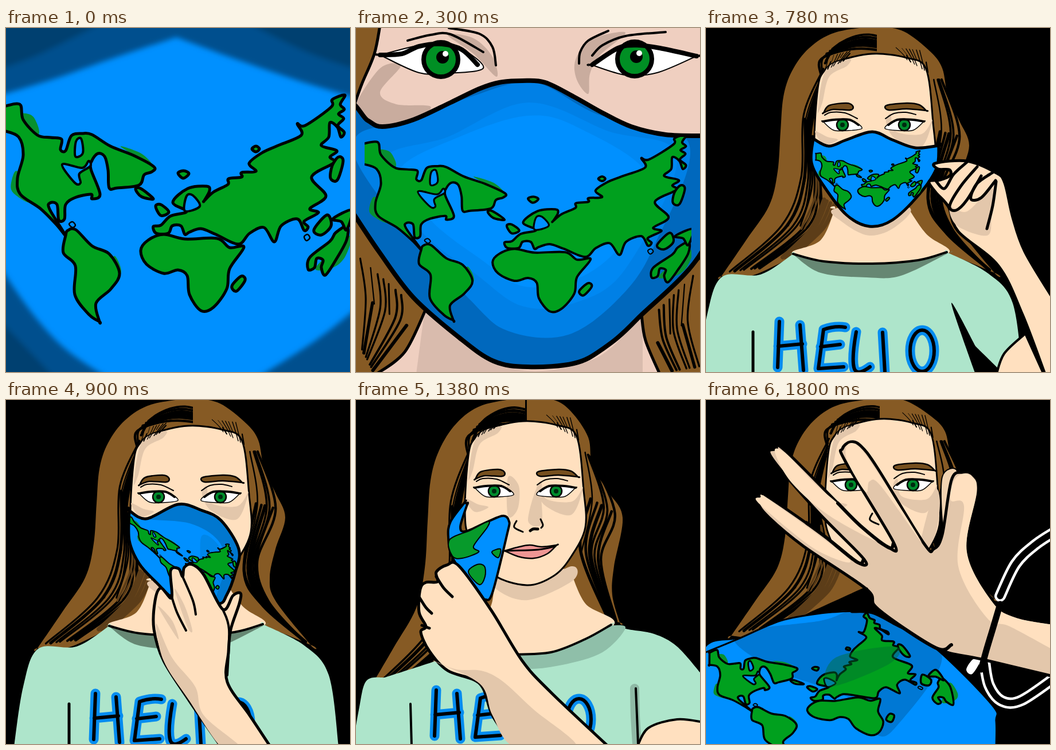
These frames come from a looping animation (600 px wide and 600 px high, 2100 ms). An HTML page:

```html
<!DOCTYPE html>
<html lang="en">
<head>
<meta charset="utf-8">
<title>Earth mask</title>
<style>
html, body { margin: 0; width: 100%; height: 100%; overflow: hidden; background: #000; }
svg { display: block; width: 100vw; height: 100vh; }
path { stroke-linecap: round; stroke-linejoin: round; }
</style>
</head>
<body>
<svg id="stage" viewBox="0 0 600 600">
  <filter id="soft"><feGaussianBlur stdDeviation="5"/></filter>
</svg>
<script>
const BLUE = '#0090ff', GREEN = '#00a01e', HAIR = '#865a24', HAIR_DARK = '#5c3d18';
const SKIN = '#ffe0bf', SHADE = '#e3c7ab', MINT = '#aee5cb';
const FRAME_MS = 300;

// Points are "x,y" tokens; a trailing * makes a sharp corner.
const parse = s => s.split(' ').flatMap(t => {
  const p = t.split(',').map(parseFloat);
  return t.endsWith('*') ? [p, p] : [p];
});

// Smooth curve through all points.
function curve(points, closed) {
  const n = points.length;
  const at = i => points[closed ? (i + n) % n : Math.max(0, Math.min(n - 1, i))];
  const control = (p, from, to, k) => p.map((v, j) => (v + (to[j] - from[j]) * k / 6).toFixed(1));
  let d = 'M' + points[0];
  for (let i = 0; i < (closed ? n : n - 1); i++) {
    const [a, b, c, e] = [at(i - 1), at(i), at(i + 1), at(i + 2)];
    d += 'C' + [control(b, a, c, 1), control(c, b, e, -1), c];
  }
  return d + (closed ? 'Z' : '');
}

const trace = (points, closed, fill, w, color = '#000') =>
  `<path d="${curve(points, closed)}" fill="${fill}" stroke="${w ? color : 'none'}" stroke-width="${w}"/>`;
const shape = (fill, s, w = 0) => trace(parse(s), true, fill, w);
const ink = (w, s, color) => trace(parse(s), false, 'none', w, color);
const dot = (x, y, r, fill, w = 0) => `<circle cx="${x}" cy="${y}" r="${r}" fill="${fill}" stroke="#000" stroke-width="${w}"/>`;
const rect = fill => `<rect width="600" height="600" fill="${fill}"/>`;
const place = (transform, body) => `<g transform="${transform}">${body}</g>`;
const move = (x, y, body) => place(`translate(${x} ${y})`, body);
const clip = (id, s, body) =>
  `<clipPath id="${id}">${shape('#000', s)}</clipPath><g clip-path="url(#${id})">${body}</g>`;

// Hair strands blended between two guide lines.
function strands(n, w, from, to, color) {
  const a = parse(from), b = parse(to);
  return Array.from({ length: n }, (_, i) => {
    const r = Math.abs(Math.sin(i * 12.9 + n) * 437.5) % 1, k = (i + r * .8) / n;
    const line = a.map((p, j) => p.map((v, m) => v + (b[j][m] - v) * k));
    const part = r > .6 ? line.slice(1) : r < .3 ? line.slice(0, -1) : line;
    return trace(part, false, 'none', w * (.5 + r), color);
  }).join('');
}

const affine = (a, b, c, d, e, f) => ([x, y]) => [a * x + c * y + e, b * x + d * y + f];

function world(warp, w) {
  const area = (s, fill = GREEN, width = w) => trace(parse(s).map(warp), true, fill, width);
  const spill = s => area(s, '#089030', 0);
  const lake = s => area(s, BLUE, w * .8);
  const northAmerica = area('-4,137* 24,133 30,160 55,187 78,191 97,194 95,212 104,214 114,188 133,184 150,186 182,206 222,222 258,242 254,251 241,256 232,274 194,279 180,279 178,248 172,224 160,219 150,231 148,246 164,290 150,298 148,290 120,296 104,308 102,333 92,335 89,308 77,305 76,316 104,362 88,343 60,315 25,290 20,262 30,222 22,190 -4,179*');
  const southAmerica = area('104,362 108,353 122,352 150,380 180,394 198,428 183,455 157,480 163,512* 145,500 120,465 121,415 100,392');
  const eurasia = area('257,346 270,344 287,328 315,320 291,304 317,280 350,276 355,284 346,301* 362,286 387,273 388,263 411,260 411,252 436,250 424,236 446,218 472,206 515,187 508,167 522,170 567,138 569,125 591,117 583,133 590,142 580,150 589,158 579,170 590,182 584,190 578,173 565,165 563,190 550,205 577,214 565,225 572,235 533,260 558,293 530,315 545,322 520,337 527,347 520,353 508,333 480,345 468,373 450,348 425,358 405,377 366,360 340,350 320,356 312,360 305,345 290,345 283,358 262,358');
  const africa = area('248,370 275,360 312,368 368,367 390,383 415,382 390,420 385,455 362,487 340,493 320,465 316,432 300,422 275,428 245,412 235,388');
  const australia = area('530,400 565,372 575,357 595,346 594,370 575,405 557,431 550,418 553,405 542,402 538,418 527,421');
  const islands = area('394,450 410,433 417,440 402,459') + area('566,262 569,240 580,225 588,232 578,265')
    + area('537,352 560,326 567,345 550,361') + area('570,333 603,318 594,352 585,338')
    + area('226,281 235,280 257,298 236,294') + area('300,253 310,249 319,254 309,262')
    + area('261,311 270,308 284,321 270,327') + area('429,211 436,206 442,211 436,216');
  return spill('-4,149* 35,149 51,160 54,188 -4,178*') + spill('20,250 9,270 13,288 42,303')
    + spill('200,207 236,219 254,239') + spill('188,398 201,425 185,452') + spill('540,418 570,418 592,398 600,362')
    + northAmerica + southAmerica + eurasia + africa + australia + islands
    + lake('98,238 133,244 144,232 147,241 128,254 130,270 120,270') + lake('315,293 326,292 338,311 312,319')
    + lake('122,198 131,193 134,218 121,224') + area('110,342 116,338 121,344 116,348', 'none', w * .5)
    + area('520,364 526,360 530,366 524,371', 'none', w * .5);
}

const almond = (x, y, s, lid) => {
  const white = shape('#fff', '-34,-6* -14,-9 16,-8 34,6 8,10 -16,9', 1.5);
  return place(`translate(${x} ${y}) scale(${s} 1)`,
    white + dot(0, 0, 10, '#008c2c', 2.5) + dot(0, 0, 4, '#002a10') + ink(4, '-34,-6 -14,-9 12,-9 28,0') + ink(2, lid));
};
const gaze = (x, y) => move(x, y,
  almond(238, 169, 1, '-31,-17 -20,-22 4,-21 26,-11') + almond(346, 169, -1, '-20,-18 -2,-22 18,-20 33,-11') +
  shape('#76501f', '205,148* 215,135 245,131 256,136 252,143 222,142', 2.5) +
  shape('#76501f', '315,135 350,131 372,134 384,144* 350,141 318,143', 2.5));

const nose = ink(3, '280,211 276,222 291,230') + ink(3, '322,208 326,218 323,223') + ink(5, '304,228 309,225 317,225');
const mouth = shape('#ee9694', '259,263* 285,256 303,253 325,256 350,253* 334,268 310,276 283,273', 2.5)
  + ink(3, '261,263 318,261 348,255');

const face = transform => place(transform,
  shape(SKIN, '206,75 230,58 290,45 350,52 384,72 396,165 399,230 375,280 345,314 297,331 235,310 197,250 189,200 195,105', 3) +
  shape(SHADE, '209,73 250,54 246,66 215,85 203,130 195,145') + shape(SHADE, '190,180 212,190 230,195 206,203') +
  shape(SHADE, '395,160 376,185 330,180 322,150 314,165 330,193 375,208') +
  strands(9, 1.5, '212,50 210,62 206,75', '260,38 252,44 240,57') +
  strands(9, 1.5, '330,34 342,45 350,55', '382,40 385,60 388,78'));

const hairLeft = transform => place(transform,
  shape(HAIR, '300,-4* 225,8 180,35 150,75 135,120 130,180 125,250 110,310 70,370 27,433* 80,432 180,385 300,330*') +
  strands(9, 4, '205,70 170,150 165,260 130,345 40,425', '198,110 185,200 200,280 190,345 95,418') +
  strands(6, 5, '190,230 190,290 165,350 120,400', '200,250 225,310 205,350 150,400', HAIR_DARK) +
  strands(7, 4, '210,55 235,25 285,10 350,30', '200,85 200,55 270,38 380,55'));
const hairWide = transform => place(transform,
  shape(HAIR, '298,-4* 345,6 390,40 412,70 422,120 442,162 459,205 442,260 432,310 442,350 503,427* 400,388 298,380*') +
  strands(8, 4, '395,90 405,180 385,300 420,360 495,422', '412,90 445,190 412,280 430,350 490,420'));
const hairClose = transform => place(transform,
  shape(HAIR, '298,-4* 345,0 375,20 405,65 412,115 440,160 465,205 450,290 447,340 460,388* 400,375 298,330*') +
  strands(8, 4, '398,90 405,170 388,260 440,385', '410,100 455,200 430,280 455,386'));

const letters = transform => {
  const d = 'M128 512L125 592M164 518L170 597M126 555L168 551M205 526L196 594M205 526Q225 519 243 522M200 556L234 552M196 594L240 591M262 530Q254 575 258 592T286 591M308 531L312 600';
  const pass = (color, w) =>
    `<g fill="none" stroke="${color}" stroke-width="${w}"><path d="${d}"/><ellipse cx="377" cy="563" rx="21" ry="36"/></g>`;
  return place(transform, pass('#058cf0', 17) + pass('#000', 6));
};

// Figure shared by the two poses with the mask worn.
const figure = () =>
  hairLeft('') + hairWide('') +
  shape(SKIN, '225,315* 200,370 150,392 205,408 290,413 370,406 425,390 385,360 350,310*') +
  shape(SHADE, '225,315 240,340 285,362 330,347 352,312') +
  shape(MINT, '28,434 95,430 152,394* 205,408 290,412 370,406 420,391* 492,428 535,480 552,604* -14,604* 2,500') +
  shape('#668773', '153,396* 205,408 290,412 370,406 422,393* 340,432 280,435 200,427') +
  ink(4, '152,394 205,407 290,411 370,405 420,391') +
  face('') + gaze(0, 0) + ink(5, '82,530 82,604') + letters('');

function ocean() {
  const deep = s => shape('#02508e', s), deeper = s => shape('#003f70', s);
  return rect(BLUE) + `<g filter="url(#soft)">` +
    deep('-20,-20* 620,-20* 620,124* 520,95 400,54 297,16* 180,55 80,90 -20,120*') +
    deep('-20,400* 15,455 60,515 110,565 185,615* -20,615*') + deep('620,482* 540,545 430,615* 620,615*') +
    deeper('-20,-20* 190,-20* 60,45 -20,75*') + deeper('400,-20* 620,-20* 620,75* 520,40') +
    deeper('-20,500* 90,615* -20,615*') + '</g>' + world(p => p, 5);
}

function closeUp() {
  const mask = '-12,140 20,161 46,172 100,160 165,130 215,106 250,95 290,92 330,95 380,120 430,148 480,172 540,186 612,188* 612,372 490,508 430,560 380,585 300,591 240,581 180,540 100,470 40,390 -12,312*';
  const shadow = s => shape('#c9ac9e', s);
  const bigEye = (x, y, white, lid) => shape('#fff', white, 2) + dot(x, y, 30, '#008f24', 8)
    + dot(x + 3, y - 4, 11, '#000') + dot(x + 8, y - 10, 5, '#fff') + ink(8, lid);
  return rect('#efcfc0') +
    shadow('-5,150 40,72 78,66 42,112 70,133 130,137 100,160 45,170') + shadow('160,12 205,18 238,50 245,85 205,45') +
    shadow('470,8 410,20 383,55 385,90 405,115 408,80 425,48') +
    shape('#d9bbad', '120,490* 200,560 300,598 420,575 500,500* 500,604* 105,604*') +
    bigEye(148, 55, '42,47* 110,30 150,26 185,36 222,70 160,79 110,78', '42,47 80,45 110,32 150,28 185,38 212,64') +
    bigEye(486, 54, '410,64* 457,37 490,30 530,34 594,49* 525,78 470,82', '412,64 457,35 490,30 530,35 594,49') +
    ink(4, '90,22 130,12 165,11 222,42') + ink(4, '162,0 215,10 238,33 244,65') +
    ink(4, '412,48 430,30 470,14 540,7') + ink(4, '389,62 391,42 405,22 440,5') +
    shape(HAIR, '-5,-5* 42,-5* 32,45 10,98 -5,140*', 5) +
    shape(HAIR, '-5,310* 60,420 122,490* 85,565 35,604* -5,604*', 5) +
    shape(HAIR, '605,395* 560,440 498,500* 505,545 530,604* 605,604*', 5) +
    strands(9, 4, '5,400 15,470 10,560', '95,480 90,520 30,598') +
    strands(9, 4, '590,430 580,510 600,590', '515,505 525,550 550,598') +
    clip('worn', mask, rect('#0068bd') +
      shape('#0080e6', '0,190 100,160 200,120 310,95 420,150 580,200 520,380 460,470 370,535 270,530 200,475 30,280') +
      shape('#0088f2', '50,230 160,190 300,130 440,180 560,225 470,420 380,480 290,485 210,430 110,350') +
      shape(BLUE, '75,250 180,190 300,153 390,175 510,260 460,380 380,440 290,450 220,405 130,335')) +
    shape('none', mask, 8) +
    clip('print', '15,190* 572,190* 585,195* 585,600* 15,600*', world(affine(.95, 0, 0, .82, 15, 90), 4));
}

function waving() {
  const mask = '187,193* 214,206 245,195 290,181 325,195 365,209 406,205* 402,245 372,290 325,335 285,346 245,326 205,275 184,235';
  return rect('#000') + figure() + shape(BLUE, mask, 5) +
    clip('small', mask, world(affine(.305, 0, 0, .257, 193, 184), 2)) +
    shape('#000', '428,480 470,555* 520,604* 470,604*') + shape(SKIN, '506,606* 520,568 557,533* 590,606*', 4) +
    shape(SKIN, '400,236 455,232 505,252 521,270 535,330 556,390 604,470* 604,606* 592,606* 552,500 510,415 440,355 423,312 401,287 389,268 408,265 426,257 424,247 405,246', 5) +
    shape(SHADE, '425,312 455,320 500,280 498,330 490,362 438,345') +
    ink(5, '455,234 432,255 416,280 402,268') + ink(5, '473,242 445,275 425,310 436,318 455,300 480,258') +
    ink(5, '500,252 472,272 462,298 480,296 505,266') + ink(5, '506,268 500,310 490,350');
}

function reaching() {
  const mask = '215,193* 245,207 300,182 340,192 375,210 406,260 400,300 385,340 368,356 300,350 262,318 232,285 215,245';
  return rect('#000') + move(28, 0, figure()) + shape(BLUE, mask) +
    clip('side', mask, shape('#0077cf', '235,205 300,180 380,205 410,260 395,330 365,352 382,290 370,245 320,215') +
      shape('#0086e8', '340,240 368,250 380,290 365,340 345,330') + world(affine(.303, .091, .11, .28, 197, 165), 2)) +
    shape('none', mask, 5) +
    shape(SKIN, '462,606* 425,550 386,492 388,440 392,400 407,355 409,337 396,341 378,365 345,305 325,287 311,292 308,308 301,294 287,298 289,345 270,328 260,350 258,400 275,455 320,525 376,606*', 5) +
    shape(SHADE, '262,390 290,450 330,500 345,550 410,606 376,606 320,525 275,455') +
    shape(SHADE, '294,330 316,395 325,402 312,360') + shape(SHADE, '265,360 300,417 290,385') +
    ink(4, '288,340 298,370 314,402') + ink(4, '308,308 326,350 331,374') + ink(4, '378,365 389,400 386,480');
}

function removing() {
  const patch = s => shape('#079a2b', s, 2);
  return rect('#000') + hairLeft('matrix(1 0 0 1.17 -5 0)') + hairClose('') +
    shape(SKIN, '240,290* 238,350 215,420 270,445 340,440 450,392 400,355 373,295*') +
    shape(SHADE, '240,300 300,324 376,290 378,315 300,349 245,330') +
    shape(MINT, '18,490 50,484* 140,455 200,435 280,444 350,438 445,392* 475,400 520,408 560,430 604,480* 604,606* -6,606* 5,540') +
    shape('#8fbfa9', '275,445* 350,438 445,393* 470,398 430,440 360,462 295,468') + ink(4, '270,444 340,440 400,417 445,392') +
    face('translate(1 -8)') + shape(SHADE, '265,135 284,150 282,190 265,202') + shape(SHADE, '318,150 324,215 300,210') +
    gaze(3, -10) + nose + mouth + ink(16, '490,600 487,550 486,503', '#8fb9a6') + ink(4, '488,503 490,550 492,600') +
    ink(4, '95,530 97,604') + letters('translate(12 -6)') + shape(SKIN, '490,606* 510,572 560,557 606,562* 606,606*', 4) +
    shape(BLUE, '190,178* 165,212 161,240 170,278 215,343 225,348 238,336 264,232 267,212 257,202 230,212 192,229 182,221 194,182*', 4) +
    patch('163,244 200,227 230,212 229,222 205,255 214,265 185,276 168,272') +
    patch('196,300 211,287 224,290 225,308 215,322') + patch('237,265 252,260 248,275') +
    shape(SKIN, '140,300 158,288 180,290 236,367 290,455 340,510 442,606* 276,606* 238,550 216,495 160,472 128,438 113,405 122,395 110,370 112,330 122,318 142,317', 5) +
    shape(SHADE, '135,455 175,470 218,472 255,490 310,540 385,606 278,606 238,550 216,495') +
    ink(5, '140,308 153,328 168,343') + ink(5, '111,345 122,362 132,372') + ink(5, '115,393 128,398');
}

function lowering() {
  return rect('#000') + hairLeft('matrix(.97 0 0 1.03 22 0)') + hairClose('scale(1 .88)') +
    shape(MINT, '48,450 110,408 200,350* 300,385 430,342* 500,350 604,345* 604,606* 102,606* 60,550') +
    shape('#8fbfa9', '165,385* 200,352* 290,386 432,343* 480,352 330,408 240,412') +
    shape(SKIN, '246,285* 238,325 203,350 240,377 290,384 350,377 432,343 390,325 374,285*') +
    shape(SHADE, '247,295 300,322 350,305 385,328 300,350 238,325') + ink(4, '203,350 240,376 290,384 350,377 432,343') +
    shape(SKIN, '399,165 412,153 419,165 411,198 400,208', 3) + face('matrix(.93 0 0 .89 31 25)') +
    shape(SHADE, '270,150 290,155 288,185 272,195') + shape(SHADE, '318,160 326,232 310,236') +
    gaze(8, 3) + move(3, 11, nose) + move(3, 6, mouth) + ink(3, '103,565 103,606') +
    letters('translate(-65 62) rotate(-7) scale(1.12 .9)') +
    shape(BLUE, '68,438 45,480 10,512 -5,560 -5,606 90,606 112,575 122,510 100,480') +
    shape('#079a2b', '22,497 5,535 -5,606 30,600 46,575 36,520', 3) + shape('#079a2b', '38,585 60,570 80,572 68,590', 3) +
    shape(SKIN, '606,343* 540,350 420,376 310,420 205,460 150,446 122,437 85,458 47,475 45,500 53,550 60,558 150,550 260,515 350,501 450,498 606,488*', 4) +
    shape(SHADE, '606,428* 500,442 250,488 180,495 140,500 80,550 150,548 260,515 350,501 450,498 606,488*') +
    ink(6, '210,458 310,418 420,375 500,354') + ink(6, '124,440 80,470 64,500 72,540 66,553') +
    ink(6, '120,480 140,505 170,517 195,518') + shape(BLUE, '88,495 106,488 120,503 100,528 82,512', 4) +
    ink(4, '88,495 78,502 82,520 100,530 96,542');
}

function presenting() {
  const globe = '-6,442 60,415 130,385 200,372 270,368 330,390 400,430 500,530 508,560 508,606* -6,606*';
  const swirl = ([x, y]) => [8 + x * (.35 + .00095 * y), 372 + .5 * y - .1 * x];
  const band = s => ink(20, s, '#fff') + ink(11, s);
  return rect('#000') + hairLeft('matrix(.96 0 0 .95 18 0)') + hairWide('matrix(1 0 0 .83 5 -3)') +
    face('matrix(.95 0 0 1 28 -12)') + shape(SHADE, '398,160 408,180 398,240 370,270') +
    gaze(15, -21) + move(10, -13, nose) + shape('#f2d4b2', '412,134 438,124 425,190 413,215', 2) +
    shape(BLUE, globe) +
    clip('globe', globe, shape('#0078d4', '50,410 200,385 270,368 380,410 410,460 340,560 300,585 250,520 120,470') +
      world(swirl, 3.5) + `<g opacity=".45">${shape('#007030', '225,450 330,430 320,460 215,500')}</g>`) +
    ink(7, '255,368 290,370 330,390 400,430 500,530 508,560 508,606') + ink(3, '-5,442 60,415 130,385 200,372 260,368') +
    band('612,228 575,252 540,286 513,342') + band('486,458 494,498 516,525 550,524 612,482') +
    shape('#fff', '466,452 478,455 464,478 454,470') +
    shape(SHADE, '606,390* 540,377 500,350 457,265 475,160 466,131 447,126 428,140 412,235 397,260 380,250 300,120 270,80 252,73 238,85 243,107 327,248 318,257 270,220 140,90 122,86 114,100 190,190 275,277 264,283 210,240 110,170 96,165 91,180 110,205 170,255 280,330 300,365 400,432 480,452 606,482*', 5) +
    shape(SKIN, '606,392* 540,380 500,353 455,265 472,160 464,134 447,129 432,142 427,175 450,185 440,290 490,380 530,395 606,436*') +
    shape(SKIN, '247,78 266,81 298,124 376,248 305,150 285,142 278,160 246,105') +
    shape(SKIN, '120,90 140,94 200,155 316,252 220,205 150,145') + shape(SKIN, '95,170 112,175 250,278 190,260 94,182') +
    ink(6, '327,250 318,257 270,220 230,180') + ink(6, '275,278 264,283 210,240 175,214') +
    ink(6, '280,330 300,365 400,432 428,427') + ink(11, '513,356 500,400 488,440 480,470');
}

const NS = 'http://www.w3.org/2000/svg';
const stage = document.getElementById('stage');
const scenes = [ocean, closeUp, waving, reaching, removing, lowering, presenting].map(draw => {
  const g = document.createElementNS(NS, 'g');
  g.innerHTML = draw();
  stage.append(g);
  return g;
});

let shown = -1;
function update(time) {
  const current = Math.floor(time / FRAME_MS) % scenes.length;
  if (current === shown) return;
  scenes.forEach((g, i) => { g.style.display = i === current ? '' : 'none'; });
  shown = current;
}

const start = performance.now();
function tick() {
  update(performance.now() - start);
  requestAnimationFrame(tick);
}
tick();
</script>
</body>
</html>
```
